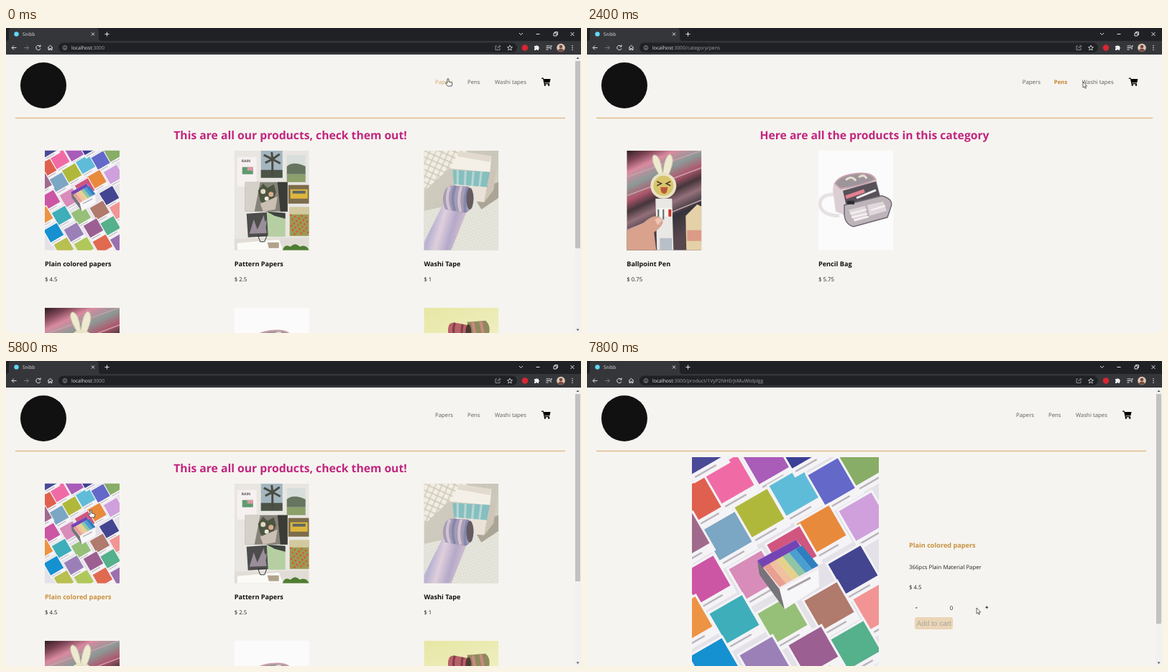
Recreate the animation shown at these times as an HTML page. Size 800 by 425 pixels, loop 8 s.

```html
<!DOCTYPE html>
<html lang="en">
<head>
<meta charset="utf-8">
<title>Stationery shop</title>
<style>
  html, body { margin: 0; height: 100%; overflow: hidden; background: #f6f4f0; }
  #stage { display: block; width: 100vw; height: 100vh; font: 7.8px "Open Sans", "Noto Sans", sans-serif; text-rendering: geometricPrecision; }
  .bold { font-weight: 700; }
  .heading { font-weight: 700; font-size: 15.68px; fill: #c1257f; text-anchor: middle; }
  .name { font-weight: 700; font-size: 9.15px; }
  .small { font-size: 6.85px; }
  .button { font: 10px "Liberation Sans", Arial, sans-serif; }
  .line { fill: none; stroke: #e3e4e6; stroke-width: 1; }
</style>
</head>
<body>
<svg id="stage" viewBox="0 0 800 425" preserveAspectRatio="none">
  <defs>
    <linearGradient id="desk" x2="1" y2="1">
      <stop stop-color="#d6cfc2"/><stop offset=".5" stop-color="#c9c6ba"/><stop offset="1" stop-color="#e2e1d8"/>
    </linearGradient>
    <linearGradient id="shelf" x2=".35" y2="1">
      <stop stop-color="#2b1c22"/><stop offset=".1" stop-color="#7d4455"/><stop offset=".2" stop-color="#d98aa0"/>
      <stop offset=".33" stop-color="#8b9a97"/><stop offset=".45" stop-color="#b0566c"/><stop offset=".55" stop-color="#45363c"/>
      <stop offset=".65" stop-color="#94707a"/><stop offset=".78" stop-color="#35333a"/><stop offset="1" stop-color="#57474c"/>
    </linearGradient>
    <linearGradient id="strip" x2="1" y2=".3">
      <stop stop-color="#e6cfda"/><stop offset=".3" stop-color="#b9b3d3"/><stop offset=".5" stop-color="#e0cfdc"/>
      <stop offset=".75" stop-color="#b4a9c9"/><stop offset="1" stop-color="#d8c3d0"/>
    </linearGradient>
    <linearGradient id="lime" x2=".3" y2="1">
      <stop stop-color="#e6e7a4"/><stop offset="1" stop-color="#f7f5da"/>
    </linearGradient>
    <pattern id="grid" width="4" height="4" patternUnits="userSpaceOnUse" patternTransform="rotate(-20)">
      <path d="M0 0H4M0 0V4" stroke="#cbcbc0" stroke-width=".5"/>
    </pattern>
    <pattern id="keys" width="8" height="8" patternUnits="userSpaceOnUse" patternTransform="rotate(24)">
      <rect x=".7" y=".7" width="6.4" height="6.4" rx="1" fill="#f2ede1"/>
    </pattern>

    <symbol id="papers" viewBox="0 0 260 347.5">
      <rect width="260" height="347.5" fill="#e4e2e8"/>
      <g id="cards"></g>
      <path d="M91 144L145 115 178 156 123 185Z" fill="#f0eaf0"/>
      <path d="M91 144L145 115 151 124 98 155Z" fill="#7444b5"/>
      <g id="strips"></g>
      <path d="M91 144L122 184 129 212 94 164Z" fill="#77737b"/>
      <path d="M122 184L176 156 177 181 129 212Z" fill="#f7f6f8"/>
      <path d="M133 185L165 168" stroke="#a8a1a5" stroke-width="3"/>
    </symbol>

    <symbol id="patterns" viewBox="0 0 104 139">
      <rect width="104" height="139" fill="#e9e6e2"/>
      <path d="M4 9H31V50H4Z" fill="#f7f0f0"/>
      <text x="10" y="16" font-size="5" class="bold" fill="#555">RAIN</text>
      <path d="M11 23H26V33H11Z" fill="#5f9b6d"/><path d="M18 23H26V28H18Z" fill="#d99aa4"/>
      <path d="M37 0H67V38H37Z" fill="#a3b6c0"/><path d="M37 27H67V38H37Z" fill="#4c5347"/>
      <path d="M53 36V12M53 12L41 6M53 12L43 17M53 12L63 5M53 12L64 18M53 12L52 2" stroke="#4a4d43" stroke-width="3"/>
      <path d="M73 6H99V44H73Z" fill="#d8dedb"/><path d="M73 22Q82 14 99 22V33H73Z" fill="#66755f"/><path d="M73 33H99V44H73Z" fill="#8ba06a"/>
      <path d="M15 44H74V85H15Z" fill="#85827a"/><path d="M15 44H36L28 85H15Z" fill="#d5d0c8"/><path d="M60 44H74V85H64Z" fill="#3b3c36"/>
      <path d="M33 56L40 46 46 52 55 47 58 58 53 72 44 78 36 70Z" fill="#4c5540"/>
      <path d="M36 74L60 64 57 82 40 85Z" fill="#c9bfb2"/>
      <circle cx="40" cy="57" r="3.500" fill="#dfd8c5"/><circle cx="51" cy="61" r="3.500" fill="#d9ad90"/><circle cx="45" cy="67" r="3" fill="#efe8dc"/>
      <path d="M75 48H104V74H75Z" fill="#7c6c4c"/><path d="M78 54H102V67H78Z" fill="#deb63c"/><path d="M81 56H99V60H81Z" fill="#5d6766"/>
      <path d="M17 88L46 86 48 119 19 121Z" fill="#4d4d4c"/>
      <path d="M21 116L27 96 32 110 41 90 45 115ZM36 104L45 97 44 106Z" fill="#9a8e9b"/>
      <path d="M45 85L71 87V120H47Z" fill="#b5cfa2"/><path d="M45 85L71 87V95L56 91Z" fill="#3f4440"/>
      <path d="M77 79H104V119H77Z" fill="#9a9b55"/><path d="M77 79H104V89H77Z" fill="#d3c99e"/>
      <g id="poppies" fill="#dc5434"></g>
      <path d="M0 123L104 121V139H0Z" fill="#e1ddd6"/><path d="M4 129L62 124 68 139H4Z" fill="#fbfaf7"/>
      <path d="M36 127L33 119H45L42 127Z" fill="none" stroke="#303030"/>
      <path d="M46 128H62V136H48Z" fill="#b0a28b"/><path d="M67 139Q70 129 78 134 85 127 91 134 100 130 104 139Z" fill="#4e7d32"/>
    </symbol>

    <symbol id="washi" viewBox="0 0 104 139">
      <rect width="104" height="139" fill="url(#desk)"/>
      <path d="M0 0H62L0 57Z" fill="url(#keys)"/>
      <path d="M0 84L104 62V139H0Z" fill="#e6e6dd"/><path d="M0 84L104 62V139H0Z" fill="url(#grid)"/>
      <path d="M68 62L86 50 104 44V66L80 82Z" fill="#aaa596"/>
      <path d="M36 25L49 1 94 8 92 30Z" fill="#f4f0e8"/><path d="M49 1L94 8 92 16 46 8Z" fill="#e2dacd"/>
      <path d="M40 27L92 30 87 53 42 50Z" fill="#86bfc0"/>
      <path d="M47 27L47 50M58 28L57 50M69 29L67 51M80 29L77 52" stroke="#b9d6d2" stroke-width="3"/>
      <path d="M42 47L88 51 84 72 64 70Z" fill="#eae2d8"/><path d="M92 30L101 22 97 55 84 72Z" fill="#cfc5b6"/>
      <path d="M26 76L60 84 38 139H0V128Z" fill="url(#strip)"/>
      <path d="M30 54Q34 48 42 49L62 50Q71 56 69 70 66 84 58 87L30 82Q23 68 30 54Z" fill="#a59bb4"/>
      <path d="M36 50Q29 67 36 83M52 50Q46 68 51 85" fill="none" stroke="#d3c3d2" stroke-width="4"/>
      <path d="M44 49Q37 67 43 84M61 51Q55 69 58 86" fill="none" stroke="#8388ad" stroke-width="4"/>
      <ellipse cx="64" cy="67" rx="5" ry="15" fill="#675b62"/>
    </symbol>

    <symbol id="pen" viewBox="0 0 104 139">
      <rect width="104" height="139" fill="url(#shelf)"/>
      <path d="M0 37L104 0M0 63L104 24M0 111L104 69" stroke="#c2a3ab" stroke-width="1.500"/>
      <path d="M82 91L98 75 104 78V139H83Z" fill="#e4d1a7"/><path d="M84 111H104V126H84Z" fill="#db9b87"/>
      <path d="M46 35Q31 11 38 6Q47 6 50 33Q53 7 60 5Q69 11 57 36Z" fill="#eee9d0" stroke="#cbc9ac"/>
      <circle cx="51" cy="49" r="18" fill="#e9e3c7"/><circle cx="51" cy="49" r="14" fill="#d9c56c"/>
      <path d="M42 43L48 46 42 49M61 43L55 46 61 49" fill="none" stroke="#4e4030" stroke-width="1.700"/>
      <path d="M47 51H57Q56 61 52 60 47 60 47 51" fill="#bb573d"/>
      <path d="M40 67H63L65 139H42Z" fill="#e9e8e5"/><path d="M42 80H63V92H42Z" fill="#f8f5ef"/>
      <path d="M44 82V96M51 82V96" stroke="#5d6670" stroke-width="2"/><path d="M60 82V92" stroke="#c83632" stroke-width="4"/>
      <path d="M0 112L23 101Q41 84 50 97Q52 104 38 114L41 139H0Z" fill="#d8a28d"/><path d="M39 96Q47 91 49 98L43 104Z" fill="#efc5b8"/>
      <path d="M46 122H63V139H46Z" fill="#b7c0c8"/>
    </symbol>

    <symbol id="bag" viewBox="0 0 104 139">
      <rect width="104" height="139" fill="#fcfbfc"/>
      <path d="M23 61Q2 61 2 75Q4 90 29 91" fill="none" stroke="#e6e2e3" stroke-width="5"/>
      <path d="M20 55Q20 35 49 32Q75 28 81 40L86 65 39 91 24 85Z" fill="#dccfd3"/>
      <path d="M23 46Q30 34 54 32Q74 30 79 40Q64 48 31 53Z" fill="#9c959b" stroke="#c9a0aa" stroke-width="2"/>
      <path d="M38 41Q46 34 52 42M56 37Q64 32 67 39" fill="none" stroke="#e7ddce" stroke-width="3"/>
      <path d="M34 56L80 43 86 64 39 78Z" fill="#575159"/>
      <path d="M38 65L64 56" stroke="#e5818f" stroke-width="5"/><path d="M53 66L80 55" stroke="#eee" stroke-width="3"/>
      <path d="M36 76L88 63Q105 68 101 78L96 93 49 106Q37 103 36 89Z" fill="#bdb4ba" stroke="#6f6873" stroke-width="1.500"/>
      <path d="M42 83L65 77 68 94 50 99ZM68 76L90 71 95 84 71 91Z" fill="#dfd7db"/>
      <path d="M44 88L67 82M46 93L68 88M50 97L70 92M73 83L93 77" stroke="#f8f4f3" stroke-width="2"/>
      <path d="M40 70H50V75H40Z" fill="#2e2d33"/>
    </symbol>

    <symbol id="rolls" viewBox="0 0 104 139">
      <rect width="104" height="139" fill="url(#lime)"/>
      <path d="M35 24Q38 20 44 21L60 24 62 46 38 44Q31 35 35 24Z" fill="#b9606a"/>
      <path d="M60 20L86 18Q94 26 90 38L66 44Z" fill="#8f8a5e"/>
      <path d="M43 21Q39 32 44 44M54 23Q51 34 55 45" fill="none" stroke="#7c3f47" stroke-width="3"/>
      <path d="M68 20L72 42M79 19L83 39" stroke="#c98a80" stroke-width="4"/>
      <ellipse cx="62" cy="33" rx="4" ry="10" fill="#4e3a34"/>
      <path d="M38 43L88 38 66 139H15Z" fill="#df8e99"/><path d="M53 42L31 139M70 40L48 139" stroke="#f4cfcb" stroke-width="4"/>
    </symbol>

    <g id="hand">
      <path d="M-1 0Q0-1 1 0V4L5 5Q6 5 5.8 7L5 10H-.5L-3.5 6Q-3.5 4.5-1 6Z" fill="#fff" stroke="#333" stroke-width=".8"/>
    </g>
    <path id="arrow" d="M0 0V8L1.8 6.5 3.1 9.2 4.4 8.6 3.2 6H5.6Z" fill="#fff" stroke="#222" stroke-width=".7"/>
    <path id="cart" d="M0 0H2.8L3.2 1.4H12.6L11.4 6.7H4.5L4.7 7.6H11V8.8H3.7L2.1 1.2H0ZM3.7 10a1.2 1.2 0 1 0 2.4 0a1.2 1.2 0 1 0-2.4 0M9 10a1.2 1.2 0 1 0 2.4 0a1.2 1.2 0 1 0-2.4 0"/>
  </defs>

  <rect width="800" height="425" fill="#f6f4f0"/>
  <g id="page"></g>

  <rect width="800" height="18" fill="#202124"/>
  <path d="M0 18Q4 18 4 14V4Q4 0 8 0H125Q129 0 129 4V14Q129 18 133 18H800V37H0Z" fill="#35363a"/>
  <rect x="73" y="20.500" width="638" height="13.500" rx="6.750" fill="#202124"/>
  <circle cx="14.500" cy="8.500" r="3.200" fill="#61dafb"/>
  <text x="23" y="11" font-size="6.500" fill="#e3e4e6">Snibb</text>
  <g class="line">
    <path d="M119 6.500L123 10.500M123 6.500L119 10.500M137.500 8.500H143.500M140.500 5.500V11.500"/>
    <path d="M14.500 27.500H8.500M11 24.500L8 27.500 11 30.500"/>
    <path d="M25 27.500H31M28.500 24.500L31.500 27.500 28.500 30.500" stroke="#77787b"/>
    <path d="M47.500 25.500A3.200 3.200 0 1 0 48 28.500M48 23.500V26H45.500"/>
    <path d="M58 27.500L61.500 24.300 65 27.500M59 27V30.500H60.700V28.500H62.300V30.500H64V27"/>
    <path d="M714 7L716.500 9.500 719 7M737.500 8.500H742.500M762 7H766V11H762ZM763.500 7V5.500H767.500V9.500H766M785.500 6L790.500 11M790.500 6L785.500 11"/>
    <path d="M683 25H681V30.500H687V28M683.500 28.500Q684 25.500 687.500 25.500M686 23.500L688 25.500 686 27.500" stroke="#a7a9ac" stroke-width=".8"/>
    <path d="M701 24L702 26.500 704.500 26.700 702.600 28.400 703.200 31 701 29.500 698.800 31 699.400 28.400 697.500 26.700 700 26.500Z" stroke-width=".8"/>
    <path d="M751.500 25H757M751.500 27.500H757M751.500 30H754.500M758 30V25H760"/>
    <circle cx="82" cy="27.500" r="2.800" stroke="#a7a9ac" stroke-width=".8"/><path d="M82 27V29.500M82 25.500V26.200" stroke="#a7a9ac"/>
  </g>
  <circle cx="722" cy="27.500" r="4.300" fill="#d92632"/>
  <path d="M735 25H737A1.400 1.400 0 0 1 739.500 25H741V26.500A1.400 1.400 0 0 1 741 29.200V31H739.500A1.300 1.300 0 0 0 737 31H735V29A1.300 1.300 0 0 0 735 26.700Z" fill="#eee"/>
  <circle cx="772" cy="27.500" r="5.800" fill="#d8c6b7"/><circle cx="772" cy="26" r="2.300" fill="#78483b"/><path d="M767.500 31Q772 26 776.500 31Q772 35 767.500 31" fill="#78483b"/>
  <g fill="#e3e4e6"><circle cx="788" cy="24.700" r=".8"/><circle cx="788" cy="27.500" r=".8"/><circle cx="788" cy="30.300" r=".8"/></g>
  <text class="small" x="91" y="29.800" fill="#e8eaed">localhost<tspan id="path" fill="#9aa0a6"></tspan></text>
  <use id="cursor"/>
</svg>

<script>
const LOOP = 8000, STEP = 200, GOLD = '#c8913f';
const $ = id => document.getElementById(id);

const cards = [
  [14, 57, '#e06050'], [52, 31, '#f06ba6'], [104, 4, '#a95cb8'], [94, 78, '#b0b83c'], [142, 48, '#5fbcd8'],
  [196, 33, '#6468c8'], [239, 6, '#88ad66'], [49, 110, '#7ba6c4'], [180, 101, '#e88a3c'], [239, 83, '#cfa0dc'],
  [139, 130, '#d0567f'], [19, 171, '#cc55a4'], [86, 164, '#d88cba'], [224, 157, '#434590'], [59, 226, '#3eaeba'],
  [126, 226, '#96c078'], [191, 208, '#b07a6c'], [259, 206, '#f29494'], [-6, 228, '#ec9444'], [31, 286, '#1590d0'],
  [101, 284, '#9b80b8'], [169, 270, '#9c5f92'], [228, 262, '#55b08c'], [10, -10, '#4a4a98'], [-10, 112, '#a06a8c'],
  [150, -18, '#3b3f95'], [66, 336, '#b8c050'], [136, 334, '#b0c85a'], [201, 326, '#e06a50'], [262, 318, '#9a70b0'],
];
$('cards').innerHTML = cards.map(([x, y, color]) => `<g transform="translate(${x} ${y}) rotate(-30)">
  <path d="M-29-27H29V37H-29Z" fill="#f4f3f6"/><path d="M-26-24H26V24H-26Z" fill="${color}"/>
  <path d="M-24 30H10" stroke="#b9b4bb" stroke-width="2.500"/></g>`).join('');

$('strips').innerHTML = ['#e8a090', '#f0c0a0', '#e5d28a', '#8fc4a5', '#4a9fd0', '#2e7fc0'].map((color, i) => {
  const x = 99 + i * 9, y = 153 - i * 5;
  return `<path d="M${x} ${y}l9-5 23 28-9 5Z" fill="${color}"/>`;
}).join('');

$('poppies').innerHTML = Array.from({ length: 24 }, (_, i) =>
  `<circle cx="${78.5 + i * 0.618 % 1 * 24.5}" cy="${90 + i * 1.15}" r="1.400"/>`).join('');

const products = {
  papers: ['Plain colored papers', '4.5'],
  patterns: ['Pattern Papers', '2.5'],
  washi: ['Washi Tape', '1'],
  pen: ['Ballpoint Pen', '0.75'],
  bag: ['Pencil Bag', '5.75'],
  rolls: ['Washi Tape Set', '3.5'],
};
const categories = {
  Papers: ['papers', 'patterns'],
  Pens: ['pen', 'bag'],
  'Washi tapes': ['washi', 'rolls'],
};

// [start time, view, address path]
const views = [
  [0, 'home', ''], [600, 'Papers', '/category/papers'], [1400, 'Pens', '/category/pens'],
  [2800, 'Washi tapes', '/category/washi'], [3600, 'cart', '/cart'], [5400, 'home', ''],
  [6400, 'product', '/product/1VyP2NHErJsMuWtdplgg'],
];
// [start time, hovered item]
const hovers = [
  [0, 'Papers'], [1300, 'Pens'], [2100, ''], [2600, 'Washi tapes'], [3100, ''], [5700, 'papers'], [6400, ''],
];
// [time, tip x, tip y, shape]
const moves = [
  [0, 615, 71, 'hand'], [1000, 615, 74, 'hand'], [1200, 618, 74, 'hand'], [1400, 658, 74, 'hand'],
  [1700, 658, 74, 'hand'], [2200, 679, 75, 'arrow'], [2400, 690, 75, 'arrow'], [2600, 704, 74, 'hand'],
  [2900, 708, 74, 'hand'], [3300, 759, 74, 'hand'], [3800, 759, 74, 'hand'], [4000, 690, 78, 'arrow'],
  [4500, 73, 97, 'hand'], [5400, 74, 97, 'hand'], [5500, 80, 120, 'arrow'], [5800, 118, 208, 'hand'],
  [6400, 119, 210, 'hand'], [6500, 180, 240, 'arrow'], [6800, 444, 334, 'arrow'], [7000, 457, 341, 'arrow'],
  [7300, 457, 341, 'arrow'], [7800, 542, 344, 'arrow'], [8000, 548, 343, 'arrow'],
];

const text = (x, y, string, attrs = '') => `<text x="${x}" y="${y}" ${attrs}>${string}</text>`;
const photo = (id, x, y, w, h) => `<use href="#${id}" x="${x}" y="${y}" width="${w}" height="${h}"/>`;
const current = (list, t) => list.findLast(item => item[0] <= t);

function card(id, x, y, hover) {
  const [name, price] = products[id];
  return photo(id, x, y, 104, 139)
    + text(x, y + 160.7, name, `class="name" fill="${hover === id ? GOLD : '#111'}"`)
    + text(x, y + 182, '$ ' + price, 'fill="#222"');
}

function header(view, hover, narrow) {
  const shift = narrow ? 0 : 8.8;
  const links = [['Papers', 597], ['Pens', 642], ['Washi tapes', 680]].map(([label, x]) => {
    const active = view === label;
    const color = active ? '#c9802f' : hover === label ? '#cfa066' : '#5c5b59';
    return text(x + shift - (active ? 1 : 0), 78, label, `fill="${color}" class="${active ? 'bold' : ''}"`);
  }).join('');
  return `<circle cx="52" cy="80" r="32" fill="#111"/>${links}
    <use href="#cart" x="${745 + shift}" y="69.500"/>
    <path d="M13 125.500H${narrow ? 778 : 787}" stroke="#e0ba8c" stroke-width="1.500"/>`;
}

const scrollbar = bottom => `<path d="M791 37H800V425H791Z" fill="#f1f1f1"/>
  <path d="M792 46H799V${bottom}H792Z" fill="#c1c1c1"/>
  <path d="M793.500 43L795.500 40.500 797.500 43ZM793.500 419.500L795.500 422 797.500 419.500Z" fill="#555"/>`;

function product(t) {
  const empty = t >= 7200;
  return photo('papers', 146, 134, 260, 347.5)
    + text(448, 260, products.papers[0], `class="name" fill="${GOLD}"`)
    + text(448, 290, '366pcs Plain Material Paper', 'fill="#222"')
    + text(448, 318, '$ 4.5', 'fill="#222"')
    + text(457, 346, '-', 'class="bold"') + text(554, 346, '+', 'class="bold"')
    + text(507, 346.5, empty ? 0 : 1, 'text-anchor="middle" fill="#223"')
    + `<rect x="456" y="357" width="53" height="17" rx="3" fill="${empty ? '#ead5b7' : GOLD}"/>`
    + text(458.5, 369.3, 'Add to cart', `class="button" fill="${empty ? '#aaa59d' : '#fff'}"`)
    + scrollbar(366);
}

function content(view, hover, t) {
  if (view === 'home') {
    return text(395.5, 155, 'This are all our products, check them out!', 'class="heading"')
      + Object.keys(products).map((id, i) =>
        card(id, 54 + i % 3 * 263.7, i < 3 ? 170.8 : 389.8, hover)).join('')
      + scrollbar(307);
  }
  if (view === 'product') return product(t);
  if (view === 'cart') {
    return text(5, 150, "You haven't added any products yet.", 'class="bold" font-size="11.700"')
      + text(5, 173, '&lt;&lt; Back to home', 'font-size="8.250" fill="#301c1c"');
  }
  return text(400, 155, 'Here are all the products in this category', 'class="heading"')
    + categories[view].map((id, i) => card(id, 55.3 + i * 266.7, 170.8, hover)).join('');
}

function placeCursor(t) {
  const from = current(moves, t), to = moves[moves.indexOf(from) + 1];
  const p = (t - from[0]) / (to[0] - from[0]), ease = p * p * (3 - 2 * p);
  const [x, y] = [1, 2].map(i => from[i] + (to[i] - from[i]) * ease);
  $('cursor').setAttribute('href', '#' + from[3]);
  $('cursor').setAttribute('transform', `translate(${x} ${y})`);
}

let shown = -1;
function frame(now) {
  const t = Math.floor(now % LOOP / STEP) * STEP;
  if (t !== shown) {
    shown = t;
    const [, view, path] = current(views, t), hover = current(hovers, t)[1];
    const narrow = view === 'home' || view === 'product';
    $('page').innerHTML = header(view, hover, narrow) + content(view, hover, t);
    $('path').textContent = ':3000' + path;
    placeCursor(t);
  }
  requestAnimationFrame(frame);
}
frame(performance.now());
</script>
</body>
</html>
```
